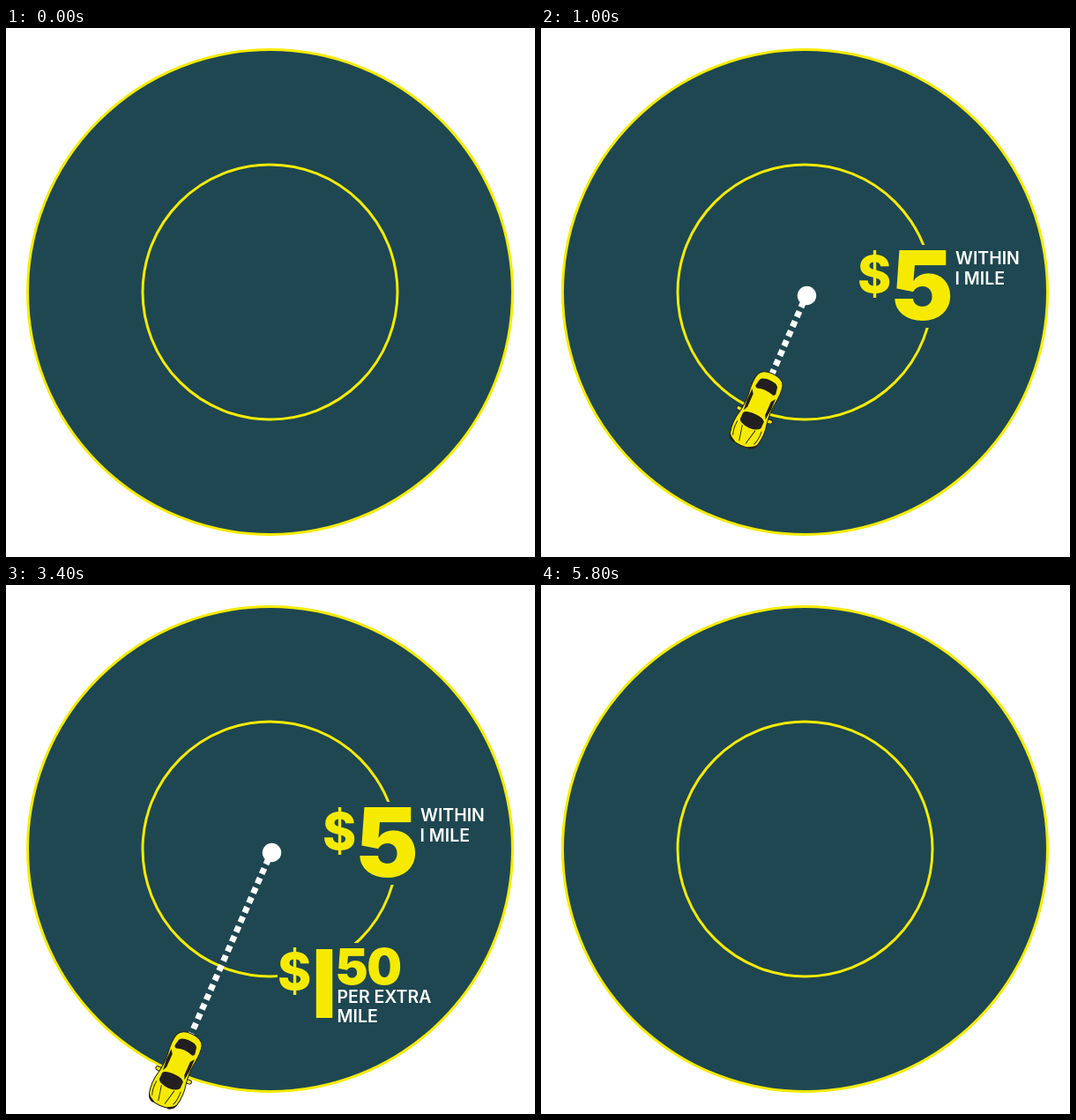
Animation of 600 by 600 pixels, one loop 5900 ms. Source, as an HTML page:

```html
<!DOCTYPE html>
<html lang="en">
<head>
<meta charset="utf-8">
<title>Fare radius</title>
<style>
  html, body { margin: 0; width: 100%; height: 100%; overflow: hidden; background: #fff; }
  svg { display: block; width: 100vw; height: 100vh; }
  text { font-family: Inter, sans-serif; font-weight: 900; fill: #f6eb00; }
  .label { font-size: 19.5px; font-weight: 600; fill: #fff; }
  .sign { font-size: 58px; font-weight: 800; }
  .ring { stroke: #f6eb00; stroke-width: 3; }
  .patch { fill: #1e4751; }
</style>
</head>
<body>
<svg viewBox="0 0 600 600">
  <circle class="ring" cx="299.5" cy="299.5" r="275" fill="#1e4751"/>
  <circle class="ring" cx="299.5" cy="299.5" r="144.5" fill="none"/>

  <g id="base">
    <rect class="patch" x="400" y="246" width="68" height="94"/>
    <text class="sign" x="359" y="300">$</text>
    <text x="398" y="331" font-size="108">5</text>
    <text class="label" x="470" y="268">WITHIN</text>
    <text class="label" x="469.5" y="291">I MILE</text>
  </g>

  <g id="extra">
    <rect class="patch" x="308" y="406" width="142" height="89"/>
    <text class="sign" x="308" y="459">$</text>
    <text x="361" y="491" font-size="107" text-anchor="middle" style="font-weight:800">I</text>
    <text x="374.5" y="453" font-size="56" letter-spacing="-1.5">50</text>
    <text class="label" x="375.5" y="474">PER EXTRA</text>
    <text class="label" x="375.5" y="496">MILE</text>
  </g>

  <g id="trail">
    <line id="dashes" x1="301" y1="303" stroke="#fff" stroke-width="7" stroke-dasharray="7 5" stroke-dashoffset="4"/>
    <circle cx="301.5" cy="303.5" r="10.7" fill="#fff"/>
  </g>

  <g id="car" fill="#f6eb00" stroke="#231f20" stroke-linejoin="round">
    <path d="M-16 4L-21 4Q-23 6 -21 8L-16 9M16 4L21 4Q23 6 21 8L16 9"/>
    <path d="M0 -45C8 -45 14 -43 16 -36C18 -29 17 -22 16 -14C15 -5 15.500 2 17 10C19 18 19 28 17 36C15 42 8 44 0 44C-8 44 -15 42 -17 36C-19 28 -19 18 -17 10C-15.500 2 -15 -5 -16 -14C-17 -22 -18 -29 -16 -36C-14 -43 -8 -45 0 -45Z"/>
    <g fill="#231f20" stroke="none">
      <path d="M-11 -33Q-9 -37 0 -37Q9 -37 11 -33L12.500 -25Q11 -22 9 -23Q0 -26 -9 -23Q-11 -22 -12.500 -25Z"/>
      <path d="M-13 9Q-11 5 0 5Q11 5 13 9L13 17Q11 21.500 0 22Q-11 21.500 -13 17Z"/>
      <path d="M-14.500 -20L-11 -15L-11 1L-13.500 6Q-15.500 -7 -14.500 -20ZM14.500 -20L11 -15L11 1L13.500 6Q15.500 -7 14.500 -20Z"/>
      <path d="M-17.500 35L-14 39L-8 42.500L-9 44Q-16 43 -17.500 35ZM17.500 35L14 39L8 42.500L9 44Q16 43 17.500 35Z"/>
    </g>
    <path fill="none" stroke-width=".9" d="M-8 22L-4 40M8 22L4 40M-15 20Q-16 30 -13 37M15 20Q16 30 13 37"/>
  </g>
</svg>
<script>
  const LOOP = 5900, STEP = 100;
  const el = id => document.getElementById(id);
  const [base, extra, trail, dashes, car] = ["base", "extra", "trail", "dashes", "car"].map(el);
  const stops = [[303, 299], [244, 433], [192, 550]];

  // Five equal steps; the first one is already taken at the start time.
  const ramp = (time, start) =>
    Math.max(0, Math.min(1, (Math.floor((time - start) / STEP) + 1) / 5));

  function draw(time) {
    const appear = ramp(time, 100);
    const first = ramp(time, 600);
    const second = ramp(time, 3000);
    const visible = 1 - ramp(time, 5400);
    const [x, y] = [0, 1].map(i => stops[0][i]
      + first * (stops[1][i] - stops[0][i])
      + second * (stops[2][i] - stops[1][i]));

    car.setAttribute("transform", `translate(${x} ${y}) rotate(24) translate(.7 0)`);
    dashes.setAttribute("x2", x + 11.4);
    dashes.setAttribute("y2", y - 25.6);
    car.setAttribute("opacity", appear * visible);
    trail.setAttribute("opacity", appear * visible);
    base.setAttribute("opacity", first * visible);
    extra.setAttribute("opacity", second * visible);
  }

  function tick() {
    draw(performance.now() % LOOP);
    requestAnimationFrame(tick);
  }
  tick();
</script>
</body>
</html>
```
